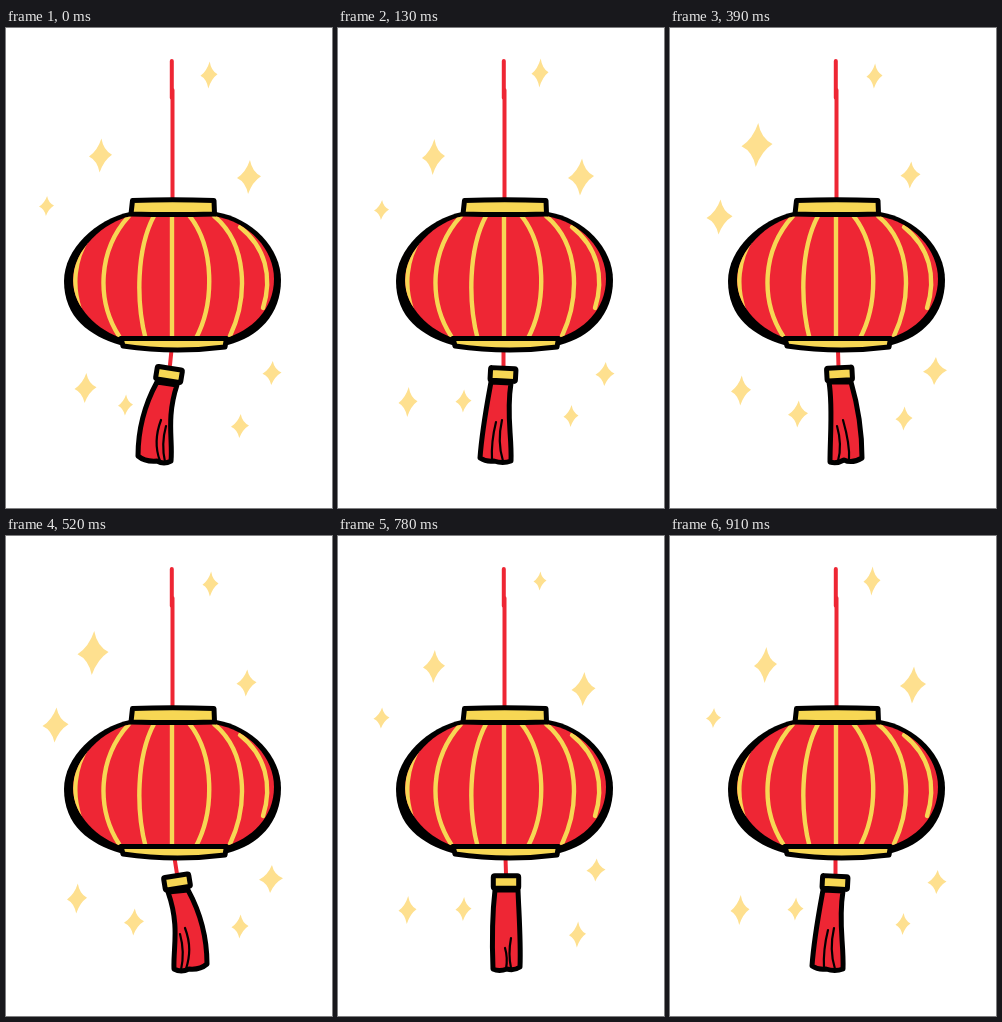
An HTML page that plays this animation: 326x480 px, repeating every 1.04 s.

```html
<!DOCTYPE html>
<html lang="en">
<head>
<meta charset="utf-8">
<title>Swinging lantern</title>
<style>
  html, body { margin: 0; width: 100%; height: 100%; overflow: hidden; background: #fff; }
  svg { display: block; width: 100%; height: 100%; }

  .red { fill: #ee2634; }
  .gold { fill: #f7d754; }
  .ink { stroke: #000; stroke-width: 5; stroke-linejoin: round; stroke-linecap: round; }
  .fold { fill: none; stroke-width: 2.2; }
  .cord { fill: none; stroke: #ee2634; stroke-width: 4; stroke-linecap: round; }
  .ribs { fill: none; stroke: #f7d754; stroke-width: 4.4; stroke-linecap: round; }
  .stars { fill: #fee08f; }

  /* Poses run 0 1 2 3 4 3 2 1, each held for an eighth of the loop. */
  .pose { visibility: hidden; animation: 1040ms step-end infinite; }
  .p0 { animation-name: p0; }
  .p1 { animation-name: p1; }
  .p2 { animation-name: p2; }
  .p3 { animation-name: p3; }
  .p4 { animation-name: p4; }
  .hold { animation-name: hold; }
  @keyframes p0 { 0% { visibility: visible } 12.5%, 100% { visibility: hidden } }
  @keyframes p1 { 0%, 25% { visibility: hidden } 12.5%, 87.5%, 100% { visibility: visible } }
  @keyframes p2 { 0%, 37.5%, 87.5%, 100% { visibility: hidden } 25%, 75% { visibility: visible } }
  @keyframes p3 { 0%, 50%, 75%, 100% { visibility: hidden } 37.5%, 62.5% { visibility: visible } }
  @keyframes p4 { 0%, 62.5%, 100% { visibility: hidden } 50% { visibility: visible } }
  @keyframes hold { 0%, 75%, 100% { visibility: hidden } 37.5% { visibility: visible } }
</style>
</head>
<body>
<svg viewBox="0 0 326 480">
  <defs>
    <path id="star" d="M.08-1Q.26-.3 1-.05Q.28 .28-.08 1Q-.28 .3-1 .06Q-.26-.28 .08-1Z"/>
    <rect id="knot" class="gold ink" x="-12.7" y="-6.3" width="25.4" height="12.6" rx="1.5"/>
    <path id="body" d="M126 188C98 193 67 222 67 252C67 280 92 303 118 311H217C246 303 268 281 268 251C268 222 244 194 208 188Z"/>
    <clipPath id="inside"><use href="#body"/></clipPath>
  </defs>

  <!-- Stars -->
  <g class="stars">
    <g class="pose p0">
      <use href="#star" transform="translate(203 47) scale(8.5 13.5)"/>
      <use href="#star" transform="translate(94.5 127.5) scale(11.5 17)"/>
      <use href="#star" transform="translate(243 149) scale(12 17)"/>
      <use href="#star" transform="translate(40.5 178) scale(7.5 10)"/>
      <use href="#star" transform="translate(79.5 360) scale(11 15)"/>
      <use href="#star" transform="translate(119.5 377) scale(7.5 10.5)"/>
      <use href="#star" transform="translate(234 398) scale(9 12)"/>
      <use href="#star" transform="translate(266 345) scale(9.5 12)"/>
    </g>
    <g class="pose p1">
      <use href="#star" transform="translate(202 45) scale(8.5 14.5)"/>
      <use href="#star" transform="translate(95.5 129) scale(11.5 18)"/>
      <use href="#star" transform="translate(243 149) scale(13 18.5)"/>
      <use href="#star" transform="translate(43.5 182) scale(7.5 10)"/>
      <use href="#star" transform="translate(70 374) scale(9.5 15)"/>
      <use href="#star" transform="translate(125.5 373) scale(8 11.5)"/>
      <use href="#star" transform="translate(233 388) scale(7.5 11)"/>
      <use href="#star" transform="translate(267 346) scale(9.5 12)"/>
    </g>
    <g class="pose p2">
      <use href="#star" transform="translate(202 45) scale(6.5 9.5)"/>
      <use href="#star" transform="translate(96 130.5) scale(11 16.5)"/>
      <use href="#star" transform="translate(245.5 153) scale(12 17)"/>
      <use href="#star" transform="translate(43.5 182) scale(8 10.5)"/>
      <use href="#star" transform="translate(69.5 374) scale(9 14)"/>
      <use href="#star" transform="translate(125.5 373) scale(8 12)"/>
      <use href="#star" transform="translate(239.5 398.5) scale(8.5 13)"/>
      <use href="#star" transform="translate(258 334) scale(9.5 11.5)"/>
    </g>
    <g class="pose hold">
      <use href="#star" transform="translate(204.5 48) scale(8 12.5)"/>
      <use href="#star" transform="translate(87 117) scale(15.5 22)"/>
      <use href="#star" transform="translate(240.5 147) scale(10 13.5)"/>
      <use href="#star" transform="translate(49.5 189) scale(13 17.5)"/>
      <use href="#star" transform="translate(71 362.5) scale(10 15)"/>
      <use href="#star" transform="translate(128 386) scale(10 13.5)"/>
      <use href="#star" transform="translate(234 390.5) scale(8.5 12)"/>
      <use href="#star" transform="translate(265 343) scale(12 14)"/>
    </g>
  </g>

  <!-- Tassel -->
  <g class="pose p0">
    <path class="cord" d="M165.500 322L164 337"/>
    <path class="red ink" d="M151 354C139 376 132 400 132 428Q139 434 151 433Q158 437 165 433C167 412 160 390 171 357Z"/>
    <path class="ink fold" d="M155 392C149 408 149 420 154 433M160 398Q155 416 159 434"/>
    <use href="#knot" transform="translate(163 346.5) rotate(9)"/>
  </g>
  <g class="pose p1">
    <path class="cord" d="M165.500 322V338"/>
    <path class="red ink" d="M153 354C149 376 144 402 142 430Q148 434 156 433Q165 436 173 433C174 408 168 386 173 355Z"/>
    <path class="ink fold" d="M158 394Q153 414 154 432M164 392Q159 414 165 433"/>
    <use href="#knot" transform="translate(165 346.5) rotate(3)"/>
  </g>
  <g class="pose p2">
    <path class="cord" d="M167.500 322L168 338"/>
    <path class="red ink" d="M157 354C154 380 154 408 155 433Q161 436 169 433Q176 435 182 431C183 406 181 380 180 354Z"/>
    <path class="ink fold" d="M167 412Q170 422 168 433M173 402Q170 418 173 432"/>
    <use href="#knot" transform="translate(168 346)"/>
  </g>
  <g class="pose p3">
    <path class="cord" d="M168 322L168.500 339"/>
    <path class="red ink" d="M159 354C163 378 160 408 160 434Q167 436 174 432Q182 436 192 430C192 402 188 378 181 354Z"/>
    <path class="ink fold" d="M167 398C171 412 171 422 168 433M173 392C177 406 180 418 179 432"/>
    <use href="#knot" transform="translate(169.5 346) rotate(-3)"/>
  </g>
  <g class="pose p4">
    <path class="cord" d="M168.500 322L171 338"/>
    <path class="red ink" d="M162 356C174 390 167 412 168 433Q175 437 183 433Q194 434 201 428C201 400 194 376 182 354Z"/>
    <path class="ink fold" d="M179 392C185 408 184 420 180 433M174 398Q179 416 175 434"/>
    <use href="#knot" transform="translate(171 346) rotate(-9)"/>
  </g>

  <!-- Lantern -->
  <path class="cord" d="M165.800 33V70M166.500 62V172"/>
  <path d="M124 184C90 191 58 221 58 253C58 290 84 308 114 317H222C252 309 275 287 275 252C275 220 246 190 210 184Z"/>
  <use href="#body" class="red"/>
  <g class="ribs" clip-path="url(#inside)">
    <path d="M82 210C68 232 66 258 74 282"/>
    <path d="M123 188C92 222 90 272 113 308"/>
    <path d="M149 186C130 220 130 275 140 312"/>
    <path d="M166 186V312"/>
    <path d="M182 186C209 218 209 276 189 312"/>
    <path d="M208 188C242 216 242 270 224 308"/>
    <path d="M234 199C259 219 267 248 257 280"/>
  </g>
  <path class="gold ink" d="M126.500 172.500Q166 171 208 172.500L208.500 186Q166 187 125 186Z"/>
  <path class="gold ink" d="M115 310.500H220.500L219 319Q168 325.500 117 318Z"/>
</svg>
</body>
</html>
```
